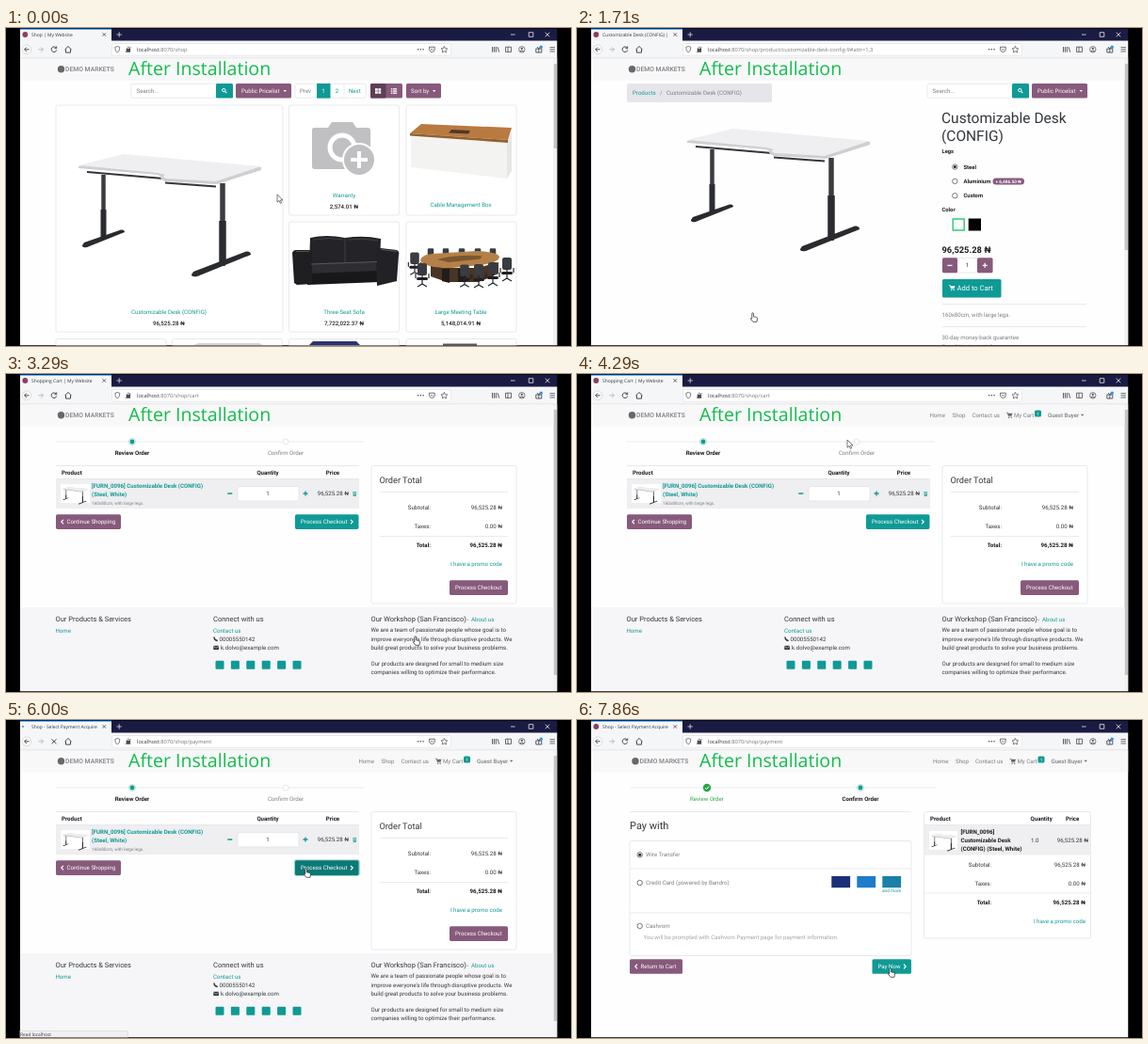
Recreate the animation shown at these times as an HTML page. Size 600 px wide and 338 px high, loop 8 s.

```html
<!DOCTYPE html>
<html lang="en">
<head>
<meta charset="utf-8">
<title>Shop checkout</title>
<style>
html, body { margin: 0; width: 100%; height: 100%; overflow: hidden; background: #000; }
svg { display: block; width: 100vw; height: 100vh; font-family: Roboto, sans-serif; }
text { font-size: 6.13px; fill: #33373b; white-space: pre; text-rendering: geometricPrecision; }
.ui { font-family: "Open Sans", sans-serif; }
.b { font-weight: 500; fill: #222; }
.bb { font-weight: 700; fill: #1c1c1f; }
.teal { fill: #119a95; }
.mute { fill: #7b7f84; }
.faint { fill: #a0a3a7; }
.white { fill: #fff; }
.done { fill: #28a745; }
.caption { fill: #12bd4c; }
.mid { text-anchor: middle; }
.end { text-anchor: end; }
</style>
</head>
<body>
<svg id="stage" viewBox="0 0 600 338"></svg>
<script>
const TEAL = '#0f9a95', DARK_TEAL = '#0c7975', PURPLE = '#875a7b', LINE = '#dfe1e5', GREY = '#4a4a4f';
const LOOP = 8000;

// Drawing helpers returning SVG markup
const text = (x, y, s, cls = '', size = 6.13, id = '') =>
  `<text ${id && `id="${id}"`} x="${x}" y="${y}" class="${cls}" style="font-size:${size}px">${s}</text>`;
const rect = (x, y, w, h, fill, more = '') => `<rect x="${x}" y="${y}" width="${w}" height="${h}" fill="${fill}" ${more}/>`;
const circle = (x, y, r, fill, more = '') => `<circle cx="${x}" cy="${y}" r="${r}" fill="${fill}" ${more}/>`;
const shape = (d, fill) => `<path d="${d}" fill="${fill}"/>`;
const line = (d, color = LINE, width = .7) => `<path d="${d}" fill="none" stroke="${color}" stroke-width="${width}"/>`;
const group = (id, ...parts) => `<g id="${id}">${parts.join('')}</g>`;
const frame = (x, y, w, h, fill = '#fff') => rect(x, y, w, h, fill, `rx="1.8" stroke="${LINE}" stroke-width=".7"`);
const caret = (x, y, fill = '#fff') => shape(`M${x} ${y}h3.4l-1.7 1.9z`, fill);
const chevron = (x, y, dir) => line(`M${x + dir} ${y - 2.3}l${-2.2 * dir} 2.3l${2.2 * dir} 2.3`, '#fff', 1.2);
const button = (x, y, w, h, fill, label, labelX = 6, size) =>
  rect(x, y, w, h, fill, 'rx="1.6"') + text(x + labelX, y + h / 2 + 2.2, label, 'white', size);
const radio = (x, y, on) => circle(x, y, 2.7, '#fff', 'stroke="#444" stroke-width=".7"') + (on ? circle(x, y, 1.5, '#222') : '');
const cart = (x, y, fill) => line(`M${x} ${y}h1.3l1 3.5h3.4`, fill, .8) +
  shape(`M${x + 1.5} ${y + .6}h5l-.9 2.4h-3.5z`, fill) + circle(x + 2.6, y + 5, .7, fill) + circle(x + 5.2, y + 5, .7, fill);
const scrollbar = (y, h) => rect(581.3, 32, 4.2, 305, '#f0f0f1') + rect(581.7, y, 3.5, h, '#c4c4c7');
const desk = (x, y, scale) => `<use href="#desk" transform="translate(${x} ${y}) scale(${scale})"/>`;
const search = x => frame(x, 59.3, 90, 15) + text(x + 5.5, 69, 'Search...', 'mute') + rect(x + 90, 59, 18, 15.6, TEAL, 'rx="1.4"') +
  circle(x + 98.3, 66.1, 1.7, 'none', 'stroke="#fff" stroke-width="1"') + line(`M${x + 99.5} 67.3l1.9 1.9`, '#fff', 1.1);
const pricelist = x => button(x, 59, 59, 15.6, PURPLE, 'Public Pricelist') + caret(x + 50.5, 66);

const deskDef = `<defs><g id="desk">
  ${line('M9 6L90 13M92 17.5L146 21.5', '#34363a', 2)}
  ${line('M26.5 9V76', '#3a3c40', 4.5) + line('M26.5 46V76', '#2a2c30', 6)}
  ${line('M153 18V106', '#3a3c40', 5.5) + line('M153 58V104', '#2a2c30', 7.5)}
  ${shape('M6 81L45 67.5Q49 67 49 70L9 86Q4 87 4 84zM122 112L178 90.5Q183 90 183 94L126 117Q120 118 120 115z', '#292b2f')}
  ${shape('M0 0L48-12L194 1V4L147 19L92 16Q85 13 88 11L84 9L0 2z', '#cfcfd2')}
  ${shape('M0-1L48-13L194 0L146 16L93 13Q87 11 92 9L84 7z', '#efeff1')}
</g></defs>`;

const camera = shape('M328 106h14l4-6h22l4 6h12q3 0 3 3v38q0 3-3 3h-56q-3 0-3-3v-38q0-3 2-3z', '#c0c0c2') +
  circle(357, 127, 13, 'none', 'stroke="#fff" stroke-width="5"') + circle(375, 140, 18, '#fff') +
  circle(375, 140, 16, '#c0c0c2') + line('M375 131v18M366 140h18', '#fff', 4);

const woodBox = shape('M430 114L532 122V160L430 148z', '#f3f3f1') + shape('M532 122L537 110V152L532 160z', '#e6e6e3') +
  shape('M429 112L441 102L537 106L533 119z', '#b97a40') + shape('M429 112L533 119V122L429 114.5z', '#94602f') +
  shape('M473 108L493 109L491 112.5L470 111.5z', '#4a3a2c');

const sofa = shape('M323 223q17-4 37 0q20-3 38 1l-1 28h-75z', '#242428') + line('M360 223v27M326 225q17-3 32 0M363 225q17-2 32 1', '#46464c', .8) +
  shape('M323 250l71-2l3 13l-76 3z', '#2d2d32') + shape('M320 261l77-3v12l-77 3z', '#18181b') +
  shape('M304 239q1-3 4-3h14q3 0 3 3v33l-16 1l-3-2z', '#1f1f22') + shape('M393 238q1-4 5-4l17 2q3 1 2 5l-2 28l-21 5z', '#222226') +
  line('M308 237.5h14M398 235.5l17 2M324 251l70-2.5', '#55555b', 1);

const chair = (x, y, s) => `<g transform="translate(${x} ${y}) scale(${s})">` +
  rect(-5, -12, 10, 13, '#3a3c42', 'rx="2"') + rect(-6, 3, 12, 3, '#1e2024', 'rx="1.5"') +
  line('M0 0v11M-5 13l5-3l5 3M-7-1v5M7-1v5', '#25262a', 1.2) + '</g>';
const meeting = [451, 467, 484, 501, 517].map(x => chair(x, 242, .65)).join('') +
  shape('M451 250l14 5h36l22-6v12l-21 9h-34l-17-6z', '#4a3424') + shape('M463 256h8v15l-8-2zM480 256h9v14h-9z', '#211d1b') +
  shape('M440 247q0-5 12-7l48-3q21 1 24 6q0 6-20 9l-31 3q-29 0-33-8z', '#b58047') +
  shape('M458 246q18-5 46-4q3 3-4 4l-30 3z', '#7a5733') +
  [[434, 250, .95], [442, 262, 1], [487, 263, .95], [502, 263, 1], [517, 261, 1], [532, 256, 1]].map(c => chair(...c)).join('');

const product = (x, titleY, name, price) => text(x, titleY, name, 'mid teal') + (price ? text(x, titleY + 12, price + ' ₦', 'mid b') : '');

const shopPage = group('shop',
  scrollbar(38, 90), search(133), pricelist(244),
  frame(307, 59.3, 75, 15), rect(330, 59, 14.5, 15.6, TEAL), line('M359 59v15'),
  text(312, 69, 'Prev', 'mute'), text(337, 69, '1', 'white mid'), text(351.5, 69, '2', 'teal mid'), text(364, 69, 'Next', 'teal'),
  rect(387, 59, 34, 15.6, PURPLE, 'rx="1.5"'), rect(387, 59, 16.5, 15.6, '#5e3f56', 'rx="1.5"'),
  [392, 395.4].flatMap(x => [64.2, 67.3].map(y => rect(x, y, 2.8, 2.5, '#fff'))).join(''),
  [64.2, 66.4, 68.6].map(y => rect(408.8, y, 1.3, 1.3, '#fff') + rect(410.7, y, 4.4, 1.3, '#fff')).join(''),
  button(425, 59, 37, 15.6, PURPLE, 'Sort by', 5), caret(453, 66),
  group('hoverShadow', [8, 5, 2].map(w => rect(53, 82.5, 241, 241, 'none', `stroke="#445" stroke-width="${w}" opacity=".06" rx="2"`)).join('')),
  frame(53, 82, 241, 241), frame(300.5, 82, 117, 117), frame(425, 82, 117, 117), frame(300.5, 206, 117, 117), frame(425, 206, 117, 117),
  [53, 176.5, 300.5, 425].map(x => frame(x, 330.5, 117, 20)).join(''),
  shape('M199 337l5-2h65l4 2z', '#d4d4d6'), shape('M322 337l4-4h46l4 4z', '#2c3274'), rect(464, 335.5, 36, 2, '#55565a'),
  group('hoverCard', rect(53.5, 295, 240, 28, '#ececef'), line('M133 304.8h80', DARK_TEAL, .6)),
  desk(77, 147, 1), camera, woodBox, sofa, meeting,
  product(173, 304, 'Customizable Desk (CONFIG)', '96,525.28'), product(359, 180, 'Warranty', '2,574.01'),
  product(483, 189.5, 'Cable Management Box'), product(359, 304, 'Three-Seat Sofa', '7,722,022.37'),
  product(483, 304, 'Large Meeting Table', '5,148,014.91'));

const productPage = group('product',
  scrollbar(38, 198), rect(53, 59, 154, 20, '#e6e6ea', 'rx="1.5"'),
  text(59, 71, 'Products', 'teal'), text(88, 71, '/', 'mute'), text(95, 71, 'Customizable Desk (CONFIG)', 'mute'),
  search(372), pricelist(483), desk(117, 120, 1),
  text(387, 101, 'Customizable Desk', '', 15.5), text(387, 119.5, '(CONFIG)', '', 15.5),
  text(387.5, 132.7, 'Legs', 'bb', 5.8),
  ['Steel', 'Aluminium', 'Custom'].map((s, i) => radio(401.3, 147.6 + i * 15.3, !i) + text(410.5, 149.7 + i * 15.3, s, 'bb', 5.9)).join(''),
  rect(441.5, 159.4, 33.5, 7, PURPLE, 'rx="3.5"'), text(458.2, 164.5, '+ 6,486.50 ₦', 'bb white mid', 4.7),
  text(387.5, 195.3, 'Color', 'bb', 5.8),
  rect(399.2, 203, 12, 12, '#fff', 'stroke="#28c76f" stroke-width="1.4"'), rect(415.7, 202.5, 13.3, 13, '#000'),
  text(387.5, 239, '96,525.28 ₦', 'bb', 9.3),
  frame(388, 244.5, 53, 15.5), rect(388, 244.3, 16, 16, PURPLE, 'rx="1.5"'), rect(425, 244.3, 16.5, 16, PURPLE, 'rx="1.5"'),
  line('M393.5 252.3h5M430.7 252.3h5M433.2 249.8v5', '#fff', 1.3), text(414.5, 254.4, '1', 'mid'),
  group('addButton', button(388, 267, 62.5, 19.5, TEAL, 'Add to Cart', 15.5, 7.6)), cart(395, 273.6, '#fff'),
  line('M388 293.5H541M388 317.5H541'), text(387.5, 307, '160x80cm, with large legs.', 'mute'),
  text(387.5, 331, '30-day money-back guarantee', 'mute'), text(387.5, 340.5, 'Free Shipping in U.S.', 'mute'));

const totals = (labelX, valueX, y) =>
  [['Subtotal:', '96,525.28'], ['Taxes:', '0.00'], ['Total:', '96,525.28']].map(([label, value], i) => {
    const cls = i == 2 ? 'bb end' : 'end';
    return text(labelX, y + i * 20, label, cls) + text(valueX, y + i * 20, value + ' ₦', cls);
  }).join('') + text(valueX, y + 60, 'I have a promo code', 'teal end');

const footer = rect(15, 248, 566.3, 89, '#f6f6f8') +
  text(52.5, 262.5, 'Our Products &amp; Services', '', 7.5) + text(220, 262.5, 'Connect with us', '', 7.5) +
  text(387.5, 262.5, 'Our Workshop (San Francisco)', '', 7.5) + text(489.5, 262.5, '- ') + text(494, 262.5, 'About us', 'teal') +
  text(52.5, 274.5, 'Home', 'teal') + text(220, 274.5, 'Contact us', 'teal') +
  line('M221 279.6q0 3.4 3.7 4', '#333', 1.5) + text(226.5, 284, '00005550142') +
  rect(220.3, 288.8, 5.6, 4.2, '#333') + line('M220.4 289.4l2.7 2l2.7-2', '#f6f6f8', .6) + text(228, 293.2, 'k.dolvo@example.com') +
  [0, 1, 2, 3, 4, 5].map(i => rect(222.5 + i * 16.4, 304.8, 9, 9, TEAL, 'rx="1"')).join('') +
  ['We are a team of passionate people whose goal is to', 'improve everyone\'s life through disruptive products. We',
   'build great products to solve your business problems.'].map((s, i) => text(387.5, 274.3 + i * 9.3, s)).join('') +
  ['Our products are designed for small to medium size', 'companies willing to optimize their performance.']
    .map((s, i) => text(387.5, 309.6 + i * 9.3, s)).join('');

const cartPage = group('cart',
  scrollbar(38, 282), line('M53 72H380'), circle(134, 72, 3.4, '#fff', 'stroke="#a9d6d4"'), circle(134, 72, 2.4, TEAL),
  circle(297, 72, 3, '#fff', `stroke="${LINE}" stroke-width=".8"`),
  text(134, 86, 'Review Order', 'bb mid'), text(297, 86, 'Confirm Order', 'mute mid'),
  text(59, 106.7, 'Product', 'bb'), text(278, 106.7, 'Quantity', 'bb mid'), text(347, 106.7, 'Price', 'bb mid'),
  line('M53 97.5H375M53 111.5H375'), rect(53, 112, 322, 31, '#efeef0'), rect(58, 117, 31, 20, '#fff'), desk(60, 122, .14),
  text(91, 121, '[FURN_0096] Customizable Desk (CONFIG)', 'bb teal'), text(91, 130.3, '(Steel, White)', 'bb teal'),
  text(91, 138.5, '160x80cm, with large legs.', 'mute', 4.7),
  line('M235.3 127h5M315.5 127h5M318 124.5v5', TEAL, 1.3), frame(246, 119.5, 65, 15.5), text(278, 129.3, '1', 'mid'),
  text(364, 129.3, '96,525.28 ₦', 'end'), line('M368.2 125.7h4M369 126.5v3h2.4v-3M370.2 126.5v3', TEAL, .8),
  button(53, 149.3, 69, 15.6, PURPLE, 'Continue Shopping', 11.5), chevron(60, 157.1, 1),
  group('checkoutHover', rect(305.8, 148.2, 70, 17.8, '#9fd5d2', 'rx="2.4"')),
  group('checkoutButton', button(307, 149.3, 67.5, 15.6, TEAL, 'Process Checkout')), chevron(367, 157.1, -1),
  frame(388, 97.5, 154, 146.5), text(396.5, 115.5, 'Order Total', '', 9.2), line('M397 125.5H533M397 172.5H533'),
  totals(451, 527, 144.2), button(471, 219.3, 62, 15.6, PURPLE, 'Process Checkout'), footer);

const paymentPage = group('payment',
  line('M57 72H382'), circle(138, 72, 4.2, '#28a745'), line('M136 72l1.5 1.6l2.7-3', '#fff', 1),
  circle(301, 72, 3.4, '#fff', 'stroke="#a9d6d4"'), circle(301, 72, 2.4, TEAL),
  text(138, 86, 'Review Order', 'mid done'), text(301, 86, 'Confirm Order', 'bb mid'),
  line('M56 97.5H355'), text(56, 115.5, 'Pay with', '', 11),
  frame(56, 128.5, 299, 122), line('M56 158H355M56 205H355'),
  ['Wire Transfer', 'Credit Card (powered by Bandro)', 'Cashvorn'].map((s, i) => {
    const y = [143.2, 173, 219][i];
    return radio(66.7, y, !i) + text(73, y + 2.1, s, 'mute');
  }).join(''),
  ['#1b2f78', '#1f7cc8', '#1a80a9'].map((c, i) => rect(270.3 + i * 27, 166, 19.8, 12.2, c)).join(''),
  text(334, 183, 'and more', 'teal mid', 4.8),
  text(70.5, 233.3, 'You will be prompted with Cashvorn Payment page for payment information.', 'faint'),
  button(56, 254.2, 56, 15.6, PURPLE, 'Return to Cart', 11.5), chevron(63, 262, 1),
  button(313.5, 254.2, 41.5, 15.6, TEAL, 'Pay Now'), chevron(348, 262, -1),
  frame(368.5, 97.5, 177, 134.5), text(375, 106.7, 'Product', 'bb'), text(481.5, 106.7, 'Quantity', 'bb'), text(519, 106.7, 'Price', 'bb'),
  rect(369, 112, 176, 31.5, '#efeef0'), line('M369 111.5H545M369 184H545'), rect(374, 118, 30, 20, '#fff'), desk(376, 123, .14),
  ['[FURN_0096]', 'Customizable Desk', '(CONFIG) (Steel, White)'].map((s, i) => text(407.5, 121 + i * 9.2, s, 'bb')).join(''),
  text(482, 130.2, '1.0'), text(543, 130.2, '96,525.28 ₦', 'end'), totals(440, 540, 156.2));

const nav = rect(15, 32, 566.3, 23.5, '#f8f8f9') + rect(581, 32, 4.5, 23.5, '#f8f8f9', 'id="navEdge"') +
  group('navShift', circle(58.5, 43.7, 3.7, '#66686c'), text(63, 46.3, 'DEMO MARKETS', 'b mute', 6.8),
    group('menu',
      group('links', text(418, 46, 'Home', 'mute'), text(442, 46, 'Shop', 'mute', 6.13, 'shopLink'), text(463, 46, 'Contact us', 'mute')),
      group('cartLink', cart(456, 41.2, '#66686c'), text(464, 46, 'My Cart', 'mute'),
        rect(486, 38.5, 7, 7, TEAL, 'rx="1.6"'), text(489.5, 43.9, '1', 'white mid', 4.6)),
      text(500, 46, 'Guest Buyer', 'b mute'), caret(535, 42.8, '#66686c')));

const chrome = rect(15, .7, 570.5, 13, '#191b42') + rect(15, 1, 97, 13, '#f5f6f7') + rect(15, .7, 97, .9, '#0a84ff') +
  group('favicon', circle(20.3, 7, 2.9, '#8c3f62')) + group('spinner', circle(18, 7, 1.1, '#4b9be8')) +
  text(27, 8.9, '', 'ui', 4.95, 'tabTitle') +
  line('M102.5 5.2l3.6 3.6M106.1 5.2l-3.6 3.6', GREY, .8) + line('M117.5 7h5.4M120.2 4.3v5.4', '#ddd', .8) +
  line('M536 7h4.6M555.2 4.7h4.6v4.6h-4.6zM572.7 4.7l4.6 4.6M577.3 4.7l-4.6 4.6', '#eee', .8) +
  rect(15, 13.5, 570.5, 18.5, '#f5f6f7') + line('M15 31.8H585.5', '#d4d4d8', .5) +
  circle(22, 22.8, 4.8, '#fff', 'stroke="#bbb" stroke-width=".5"') + line('M24.7 22.8h-5M22 20.4l-2.4 2.4l2.4 2.4', GREY, 1) +
  line('M34.5 22.8h5M37.2 20.4l2.4 2.4l-2.4 2.4', '#b5b5b8', .9) +
  group('reload', line('M53.2 21a2.8 2.8 0 1 0 .5 2.4M53.7 19.5v2.2h-2.2', GREY, 1)) +
  group('stop', line('M48.5 20.3l5 5M53.5 20.3l-5 5', GREY, 1)) +
  line('M62.4 23l3.6-3.5l3.6 3.5M63.5 22.5v3.6h5v-3.6', GREY, 1) +
  frame(112.5, 16.5, 360, 12.7) + line('M115.8 20.3l2.5-.8l2.5.8q.2 4.3-2.5 5.8q-2.7-1.5-2.5-5.8z', GREY, .7) +
  rect(127.7, 22, 4.4, 3.7, GREY, 'rx=".5"') + line('M128.6 22v-1q1.3-2.3 2.6 0v1M127 25.8l5.6-5.8', GREY, .7) +
  text(139, 25, '', 'ui', 5.7, 'url') +
  [437.6, 440.3, 443].map(x => circle(x, 22.8, .8, GREY)).join('') +
  line('M449.5 20.2h5.8v2.5q-.4 2.4-2.9 3q-2.5-.6-2.9-3zM451 22l1.4 1.4l1.4-1.4', GREY, .8) +
  line('M465.4 19.4l1 2.2l2.4.3l-1.8 1.7l.5 2.4l-2.1-1.2l-2.1 1.2l.5-2.4l-1.8-1.7l2.4-.3z', GREY, .7) +
  line('M516.5 20v5.7M518.4 20v5.7M520.3 20v5.7M522 20.2l1.7 5.4', GREY, .9) + line('M530.5 20.2h6v5.2h-6zM533 20.2v5.2', GREY, .8) +
  circle(547.8, 22.8, 3.2, 'none', `stroke="${GREY}" stroke-width=".7"`) + circle(547.8, 21.8, 1.1, GREY) + line('M545.8 25q2-2 4 0', GREY, .9) +
  line('M562.8 22h6v4h-6zM565.8 22v4M564 20l1.8 2l1.8-2', GREY, .9) + circle(568.2, 20.2, 1.7, '#3b8fe0') +
  line('M577.5 20.6h5.4M577.5 22.8h5.4M577.5 25h5.4', GREY, .8);

const pointer = group('pointer',
  group('arrow', '<path d="M0 0v8.2l2-1.8l1.3 2.9l1.4-.6l-1.3-2.8h2.7z" fill="#fff" stroke="#222" stroke-width=".6"/>'),
  group('hand', '<path d="M-.2.8q0-1 .9-1t.9 1v3.1l2.9.5q1.2.2 1 1.5l-.5 3.4h-4l-2.7-3.3q.3-1.1 1.5-.2z" fill="#fff" stroke="#222" stroke-width=".7"/>'));

const stage = document.getElementById('stage');
stage.innerHTML = deskDef + rect(0, 0, 600, 338, '#000') + rect(15, 32, 570.5, 305.5, '#fefefe') +
  shopPage + productPage + cartPage + paymentPage + nav + chrome +
  text(130, 49.6, 'After Installation', 'ui caption', 19.6) +
  group('status', rect(14.5, 330.5, 140, 8, '#f0f0f2', 'id="statusBox" stroke="#cfcfd3" stroke-width=".5"'),
    text(15, 336.4, '', 'ui', 4.85, 'statusText')) +
  rect(0, 337.5, 600, 1, '#000') + rect(585.5, 0, 15, 338, '#000') + rect(0, 0, 14.5, 338, '#000') + pointer;

const el = Object.fromEntries([...stage.querySelectorAll('[id]')].map(e => [e.id, e]));
const show = (id, on) => { el[id].style.display = on ? '' : 'none'; };

const PAGES = {
  shop: { title: 'Shop | My Website', url: '/shop', from: 0, menuAt: 280 },
  product: { title: 'Customizable Desk (CONFIG) |', url: '/shop/product/customizable-desk-config-9#attr=1,3', from: 1570, menuAt: 1720 },
  cart: { title: 'Shopping Cart | My Website', url: '/shop/cart', from: 3000, menuAt: 3570 },
  payment: { title: 'Shop - Select Payment Acquire', url: '/shop/payment', from: 6580, menuAt: 6720 }
};
const DESK_LINK = 'localhost:8070/shop/product/customizable-desk-config-9';
// from, to, text, box width
const STATUS = [
  [1000, 1570, DESK_LINK, 140], [2250, 3000, DESK_LINK + '#', 142],
  [5200, 5500, 'localhost:8070/shop/checkout?express=1', 105], [5500, 6580, 'Read localhost', 115]
];
const LOADING = [[1290, 1570], [2570, 3000], [5500, 6580]];
const HAND = [[960, 1750], [2220, 3560], [5200, 6350], [7450, LOOP]];
// start, end, destination
const MOVES = [[250, 1050, 186, 303], [1720, 2300, 434, 279], [3500, 4200, 287, 70], [4500, 5300, 318, 158], [6300, 7600, 332, 264]];

const during = (t, spans) => spans.some(([a, b]) => t >= a && t < b);
const ease = p => p * p * (3 - 2 * p);

function pointerAt(t) {
  let [x, y] = [288, 177];
  for (const [a, b, toX, toY] of MOVES) {
    const p = ease(Math.min(1, Math.max(0, (t - a) / (b - a))));
    x += (toX - x) * p;
    y += (toY - y) * p;
  }
  return [x, y];
}

function render(t) {
  const name = Object.keys(PAGES).filter(k => PAGES[k].from <= t).pop();
  const page = PAGES[name], loading = during(t, LOADING);
  const address = name == 'cart' && t >= 5500 ? PAGES.payment : page;
  for (const k in PAGES) show(k, k == name);
  show('menu', t >= page.menuAt);
  const hasCart = name == 'cart' || name == 'payment';
  show('cartLink', hasCart);
  el.links.setAttribute('transform', `translate(${hasCart ? -43.5 : 0} 0)`);
  el.shopLink.setAttribute('class', name == 'shop' ? 'b' : 'mute');
  el.navShift.setAttribute('transform', `translate(${name == 'payment' ? 3.5 : 0} 0)`);
  show('navEdge', name == 'payment');

  el.tabTitle.textContent = address.title;
  el.url.innerHTML = `localhost<tspan fill="#77777c">:8070${address.url}</tspan>`;
  show('favicon', !loading);
  show('spinner', loading);
  el.spinner.setAttribute('transform', `translate(${2 - 2 * Math.cos(t / 1000 * Math.PI * 2)} 0)`);
  show('reload', !loading);
  show('stop', loading);

  show('hoverShadow', t >= 1000);
  show('hoverCard', t >= 1000);
  el.addButton.firstChild.setAttribute('fill', t >= 2250 ? DARK_TEAL : TEAL);
  el.checkoutButton.firstChild.setAttribute('fill', t >= 5200 ? DARK_TEAL : TEAL);
  show('checkoutHover', t >= 5500);

  const status = STATUS.find(([a, b]) => t >= a && t < b);
  show('status', status);
  if (status) {
    el.statusText.textContent = status[2];
    el.statusBox.setAttribute('width', status[3]);
  }
  const hand = during(t, HAND);
  show('hand', hand);
  show('arrow', !hand);
  el.pointer.setAttribute('transform', `translate(${pointerAt(t)})`);
}

const start = performance.now();
function tick() {
  render((performance.now() - start) % LOOP);
  requestAnimationFrame(tick);
}
tick();
</script>
</body>
</html>
```
